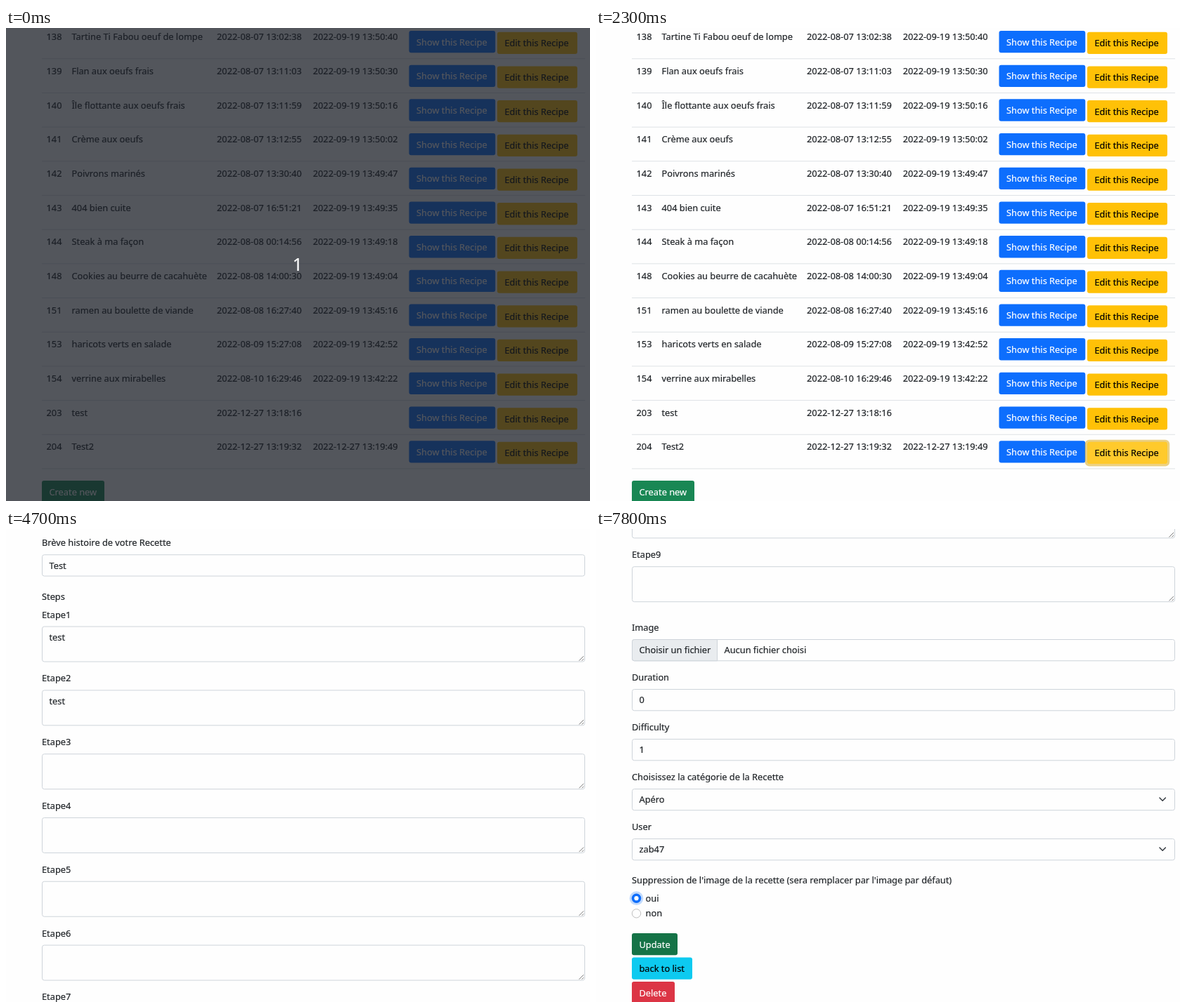
An HTML page that plays this animation: 831 by 674 pixels, repeating every 8000 ms.

```html
<!DOCTYPE html>
<html lang="fr">
<head>
<meta charset="utf-8">
<title>Recipes</title>
<style>
html, body { margin: 0; width: 100%; height: 100%; overflow: hidden; background: #fefefe; }
svg { display: block; }
text {
  font: 12.8px "Noto Sans", "Open Sans", sans-serif; white-space: pre;
  color: #212529; fill: currentColor; stroke: currentColor; stroke-width: .2;
}
.title { font-size: 31.5px; font-weight: 500; stroke-width: .8; }
.white { color: #fff; }
.black { color: #000; }
.muted { color: #fff; opacity: .55; }
.count { font-size: 25px; color: #fff; text-anchor: middle; }
.field { fill: #fefefe; stroke: #ced4da; }
.grip { stroke: #777; fill: none; }
.chevron { stroke: #343a40; stroke-width: 1.5; fill: none; stroke-linecap: round; stroke-linejoin: round; }
</style>
</head>
<body>
<svg id="stage" width="831" height="674">
  <defs>
    <linearGradient id="shade" x2="0" y2="1">
      <stop stop-color="#000" stop-opacity="0"/>
      <stop offset="1" stop-color="#000" stop-opacity=".07"/>
    </linearGradient>
  </defs>
  <g id="list"></g>
  <g id="countdown">
    <rect width="831" height="674" fill="rgb(26,30,38)" fill-opacity=".75"/>
    <text class="count" x="415" y="346">1</text>
  </g>
  <svg id="edit" width="824" height="674"><g id="page"></g></svg>
  <rect id="status" x="4" y="669" width="288" height="5" fill="url(#shade)"/>
</svg>
<script>
const LOOP = 8000, SCROLL_END = 1035.5;
const $ = id => document.getElementById(id);

const text = (x, y, s, cls = '') => `<text x="${x}" y="${y}" class="${cls}">${s}</text>`;
const rect = (x, y, w, h, attrs = '') => `<rect x="${x}" y="${y}" width="${w}" height="${h}" ${attrs}/>`;
const button = (x, y, w, label, fill, cls, id = '') =>
  rect(x, y, w, 31.3, `rx="3" fill="${fill}" id="${id}"`) + text(x + 10.5, y + 20.5, label, cls);
const box = (y, h, value = '') =>
  rect(51.5, y + .5, 772, h - 1, 'rx="3" class="field"') + text(61.5, y + 20.3, value);
const field = (y, label, value) => text(51, y, label) + box(y + 12, 31.3, value);
const chevron = y => `<path class="chevron" d="M802 ${y - 2}l4.2 4.2 4.2-4.2"/>`;

const rows = [
  [138, 'Tartine Ti Fabou oeuf de lompe', '08-07 13:02:38', '09-19 13:50:40'],
  [139, 'Flan aux oeufs frais', '08-07 13:11:03', '09-19 13:50:30'],
  [140, 'Île flottante aux oeufs frais', '08-07 13:11:59', '09-19 13:50:16'],
  [141, 'Crème aux oeufs', '08-07 13:12:55', '09-19 13:50:02'],
  [142, 'Poivrons marinés', '08-07 13:30:40', '09-19 13:49:47'],
  [143, '404 bien cuite', '08-07 16:51:21', '09-19 13:49:35'],
  [144, 'Steak à ma façon', '08-08 00:14:56', '09-19 13:49:18'],
  [148, 'Cookies au beurre de cacahuète', '08-08 14:00:30', '09-19 13:49:04'],
  [151, 'ramen au boulette de viande', '08-08 16:27:40', '09-19 13:45:16'],
  [153, 'haricots verts en salade', '08-09 15:27:08', '09-19 13:42:52'],
  [154, 'verrine aux mirabelles', '08-10 16:29:46', '09-19 13:42:22'],
  [203, 'test', '12-27 13:18:16', ''],
  [204, 'Test2', '12-27 13:19:32', '12-27 13:19:49'],
];

function listPage() {
  const body = rows.map(([id, name, created, updated], i) => {
    const y = i * 48.68;
    return text(57.5, y + 17.3, id) + text(93.5, y + 17.3, name)
      + text(300, y + 17.3, '2022-' + created)
      + (updated && text(436.7, y + 17.3, '2022-' + updated))
      + button(573.5, y + 4, 122.8, 'Show this Recipe', '#0d6efd', 'white')
      + button(699, y + 5.7, 114, 'Edit this Recipe', '#ffc107', 'black', 'edit' + id)
      + rect(51, y + 43.3, 773, 1, 'fill="#dee2e6"');
  }).join('');
  const ring = rect(697.4, 588.3, 117.2, 34.5,
    'id="ring" rx="4.5" fill="none" stroke="#d9a406" stroke-width="3.3"');
  return body + ring + button(51, 645, 89, 'Create new', '#198754', 'white');
}

function header() {
  const links = [[493, 'Home'], [542, 'Users'], [588.5, 'Recipes'], [648, 'Ingredients'],
    [730, 'Groceries'], [800, 'Categories']];
  return `<svg width="823.2" height="91">`
    + rect(50.8, 0, 773, 90.8, 'fill="#007170"')
    + rect(61, 0, 425, 84, 'fill="#fff"')
    + '<circle cx="139" cy="15" r="62" fill="#26736f"/>'
    + links.map(([x, s]) => text(x, 17.3, s, s === 'Recipes' ? 'white' : 'muted')).join('')
    + '</svg>' + rect(51, 103.5, 773, 1, 'fill="#c8c9ca"');
}

function steps() {
  return Array.from({ length: 9 }, (_, i) => {
    const y = 350.3 + i * 90.8, b = y + 62.6;
    return text(51, y, 'Etape' + (i + 1)) + box(y + 12, 51, i < 2 ? 'test' : '')
      + `<path class="grip" d="M815.5 ${b - 1.5}l6.5-6.5M819.5 ${b - 1.5}l2.5-2.5"/>`;
  }).join('');
}

const radio = (y, label, id) =>
  `<circle id="${id}Ring" cx="57.5" cy="${y}" r="8.2" fill="none" stroke="#0d6efd" stroke-width="3.3"/>
   <circle cx="57.5" cy="${y}" r="6.2" fill="#fefefe" stroke="#bfbfbf"/>
   <g id="${id}"><circle cx="57.5" cy="${y}" r="6.7" fill="#0d6efd"/>
   <circle cx="57.5" cy="${y}" r="3.1" fill="#fff"/></g>` + text(70.5, y + 4.5, label);

function formEnd() {
  return `<g transform="translate(0 ${SCROLL_END})">`
    + text(51, 145, 'Image') + box(157, 31.3)
    + '<path d="M54.5 157.5H172.5V187.8H54.5a3 3 0 0 1-3-3V160.5a3 3 0 0 1 3-3z" fill="#e9ecef" stroke="#ced4da"/>'
    + text(61.5, 177.3, 'Choisir un fichier') + text(182.5, 177.3, 'Aucun fichier choisi')
    + field(216, 'Duration', '0') + field(287, 'Difficulty', '1')
    + '<path id="spinner" d="M803.5 311.5l3.5-4 3.5 4zM803.5 317.5l3.5 4 3.5-4z" fill="#666"/>'
    + field(358, 'Choisissez la catégorie de la Recette', 'Apéro') + chevron(385)
    + field(429, 'User', 'zab47') + chevron(456)
    + text(51, 505.3, "Suppression de l'image de la recette (sera remplacer par l'image par défaut)")
    + radio(526.2, 'oui', 'yes') + radio(547.8, 'non', 'no')
    + button(51, 576, 65, 'Update', '#198754', 'white', 'update')
    + button(51, 610.5, 86, 'back to list', '#0dcaf0', 'black', 'back')
    + button(51, 645, 61, 'Delete', '#dc3545', 'white') + '</g>';
}

$('list').innerHTML = listPage();
$('page').innerHTML = header() + text(51, 148.3, 'Edit Recipe', 'title')
  + field(177, 'Titre de la Recette', 'Test2')
  + field(248, 'Brève histoire de votre Recette', 'Test')
  + text(51, 325, 'Steps') + steps() + formEnd();

const smooth = (t, start, length) => {
  const p = Math.min(1, Math.max(0, (t - start) / length));
  return p * p * (3 - 2 * p);
};
const show = (id, on) => $(id).style.display = on ? '' : 'none';
const fade = (id, amount) => $(id).style.opacity = amount;
const tint = (id, from, to, amount) =>
  $(id).style.fill = `color-mix(in srgb, ${to} ${amount * 100}%, ${from})`;

function render(now) {
  const t = Math.floor(now % LOOP / 100) * 100;
  const editing = t >= 2900;
  show('countdown', t < 100);
  show('list', !editing);
  show('edit', editing);
  show('status', editing && t < 3800);

  // Pointer moves down to the last row, then clicks.
  tint('edit203', '#ffc107', '#ffca2c', smooth(t, 1000, 200) - smooth(t, 1500, 200));
  tint('edit204', '#ffc107', '#ffca2c', smooth(t, 1600, 200));
  fade('ring', .5 * smooth(t, 2100, 200));

  const scroll = 59.5 * (smooth(t, 3700, 300) + smooth(t, 4100, 300))
    + (SCROLL_END - 119) * smooth(t, 4540, 760);
  $('page').setAttribute('transform', `translate(0 ${-scroll})`);
  show('spinner', t >= 5300 && t < 5900);

  const chosen = smooth(t, 6700, 200);
  fade('yes', chosen);
  fade('yesRing', .25 * chosen);
  fade('no', 1 - chosen);
  fade('noRing', 0);
  tint('back', '#0dcaf0', '#31d2f2', smooth(t, 7400, 200) - smooth(t, 7600, 200));
  tint('update', '#198754', '#157347', smooth(t, 7600, 200));
  requestAnimationFrame(render);
}
render(0);
</script>
</body>
</html>
```
